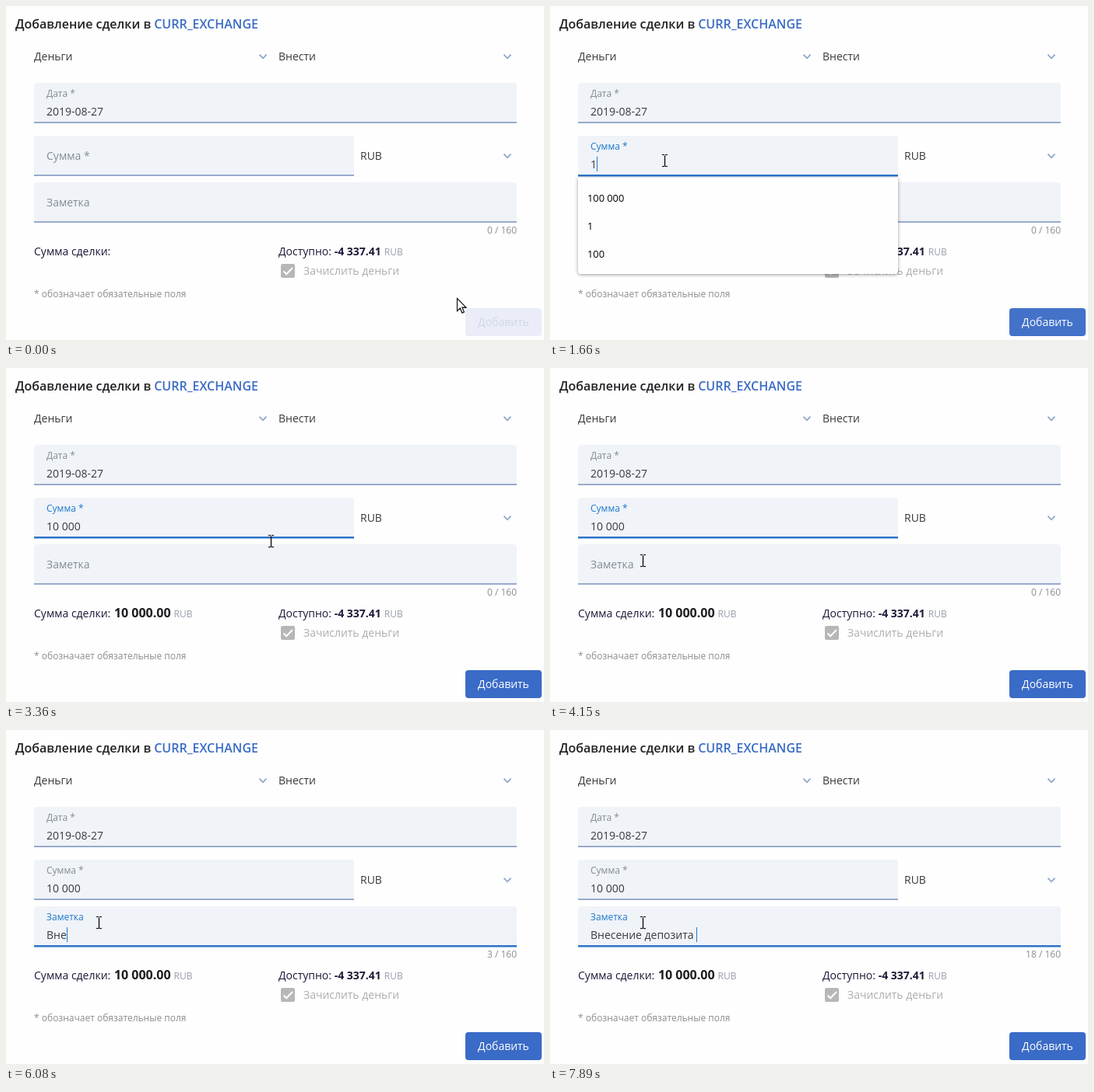
These frames come from a looping animation (691 px wide and 430 px high, 8 s). An HTML page with a canvas:

```html
<!DOCTYPE html>
<html lang="ru">
<head>
<meta charset="utf-8">
<title>Добавление сделки</title>
<style>
html, body { margin: 0; width: 100%; height: 100%; overflow: hidden; background: #fefefe; }
canvas { display: block; }
</style>
</head>
<body>
<canvas id="stage" width="691" height="430"></canvas>
<script>
const ctx = document.getElementById('stage').getContext('2d');
const LOOP = 8000, AMOUNT_FOCUS = 680, NOTE_FOCUS = 4155;

const GREY = [134, 139, 148], BLUE = [30, 120, 205];
const TEXT = '#3a3a3c', NAVY = '#1d1a38', PALE = '#9a9eae', HINT = '#8c8d92', LINK = '#3a6cc4';

const amountKeys = [[1510, '1'], [1740, '10'], [1920, '100'], [2200, '1 000'], [2440, '10 000']];
const noteText = 'Внесение депозита ';
const noteTimes = [5720, 5950, 6080, 6250, 6350, 6460, 6560, 6740, 6840,
  7020, 7100, 7250, 7360, 7460, 7570, 7680, 7780, 7890];
const noteKeys = noteTimes.map((time, i) => [time, noteText.slice(0, i + 1)]);
const amountHistory = ['100 000', '1', '100', '22', '7', '500 000'];
const noteHistory = ['ЗАметка'];

// time, x, y of the pointer
const pointerPath = [
  [40, 579, 376], [120, 470, 330], [240, 240, 226], [350, 150, 193], [630, 150, 193], [680, 147, 199],
  [3359, 147, 199], [3360, 341, 223], [3520, 190, 232], [3650, 60, 250], [3740, 11, 258],
  [3840, 11, 258], [4000, 105, 250], [4100, 119, 248]
];

const font = (size, weight = 400) => `${weight} ${size}px "Open Sans", "Noto Sans", sans-serif`;
const clamp = p => Math.min(1, Math.max(0, p));
const ease = p => 1 - (1 - clamp(p)) ** 3;
const lerp = (a, b, p) => a + (b - a) * p;
const mix = (a, b, p) => `rgb(${a.map((v, i) => Math.round(lerp(v, b[i], p)))})`;

function text(str, x, y, color = TEXT, size = 14, weight = 400, align = 'left') {
  ctx.font = font(size, weight);
  ctx.fillStyle = color;
  ctx.textAlign = align;
  ctx.fillText(str, x, y);
  return x + ctx.measureText(str).width;
}

function box(x, y, w, h, color, radii = 0) {
  ctx.fillStyle = color;
  ctx.beginPath();
  ctx.roundRect(x, y, w, h, radii);
  ctx.fill();
}

function line(points, color, width) {
  ctx.strokeStyle = color;
  ctx.lineWidth = width;
  ctx.beginPath();
  points.forEach(([x, y]) => ctx.lineTo(x, y));
  ctx.stroke();
}

const chevron = (x, y) => line([[x - 4.5, y - 2.3], [x, y + 2.3], [x + 4.5, y - 2.3]], '#8fa4c8', 1.8);

// floated: label raised 0..1, tint: label blue 0..1, focus: ms since focus or -1
function field(y, w, label, value, floated, tint, focus) {
  box(36, y, w, 52, '#f0f3f8', [4, 4, 0, 0]);
  box(36, y + 50, w, 2, '#97abcc');
  if (focus >= 0) {
    const width = w * lerp(0.5, 1, ease(focus / 300));
    ctx.globalAlpha = clamp(focus / 100);
    box(36 + (w - width) / 2, y + 50, width, 2.6, '#2d73c8');
    ctx.globalAlpha = 1;
  }
  text(label, 52, lerp(y + 31, y + 18, floated), mix(GREY, BLUE, tint), lerp(14, 12, floated));
  return text(value, 52, y + 42);
}

function caret(t, x, y, focusTime, keys) {
  const last = Math.max(focusTime, ...keys.map(k => k[0]).filter(time => time <= t));
  if ((t - last) % 1000 < 505) box(Math.round(x), y, 1, 19, '#2277cc');
}

function popup(y, w, history, typed) {
  const rows = history.filter(row => row.startsWith(typed));
  if (!rows.length) return;
  ctx.save();
  ctx.shadowColor = 'rgba(0,0,0,.4)';
  ctx.shadowBlur = 4;
  ctx.shadowOffsetY = 1;
  box(36, y, w, 16 + rows.length * 36, '#fefefe', [0, 0, 4, 4]);
  ctx.restore();
  rows.forEach((row, i) => text(row, 48, y + 31 + i * 36, '#000', 12.8, 500));
}

function typedAt(keys, t) {
  const done = keys.filter(k => k[0] <= t);
  return done.length ? done[done.length - 1][1] : '';
}

function pointerAt(t) {
  const next = pointerPath.findIndex(p => p[0] > t);
  if (next === 0) return pointerPath[0].slice(1);
  if (next < 0) return pointerPath[pointerPath.length - 1].slice(1);
  const a = pointerPath[next - 1], b = pointerPath[next];
  const p = (t - a[0]) / (b[0] - a[0]);
  return [lerp(a[1], b[1], p), lerp(a[2], b[2], p)];
}

function pointer(t) {
  const [x, y] = pointerAt(t).map(Math.round);
  const overField = x > 36 && y > 167 && y < 280 && x < (y < 227 ? 447 : 656);
  ctx.save();
  ctx.translate(x + 0.5, y + 0.5);
  if (overField) {
    line([[0, -7], [0, 7]], '#111', 1.4);
    for (const end of [-8, 7]) {
      line([[-3.5, end], [-0.5, end]], '#111', 1.2);
      line([[0.5, end], [3.5, end]], '#111', 1.2);
    }
  } else {
    ctx.fillStyle = '#fff';
    ctx.strokeStyle = '#111';
    ctx.lineWidth = 1.1;
    ctx.stroke(Object.assign(new Path2D('M0 0V16L3.8 12.5L6.4 18.5L8.8 17.4L6.3 11.6H11.4Z')));
    ctx.fill(new Path2D('M0 0V16L3.8 12.5L6.4 18.5L8.8 17.4L6.3 11.6H11.4Z'));
    ctx.stroke(new Path2D('M0 0V16L3.8 12.5L6.4 18.5L8.8 17.4L6.3 11.6H11.4Z'));
  }
  ctx.restore();
}

function draw(t) {
  const amount = typedAt(amountKeys, t), note = typedAt(noteKeys, t);
  const onAmount = t >= AMOUNT_FOCUS && t < NOTE_FOCUS, onNote = t >= NOTE_FOCUS;
  const amountUp = ease((t - AMOUNT_FOCUS) / 380), noteUp = ease((t - NOTE_FOCUS) / 380);
  const enabled = ease((t - 1500) / 260);

  box(0, 0, 691, 430, '#fefefe');
  const titleEnd = text('Добавление сделки в ', 12, 29, '#222226', 16, 600);
  text('CURR_EXCHANGE', titleEnd, 29, LINK, 16, 600);

  text('Деньги', 36, 70);
  text('Внести', 350, 70);
  text('RUB', 455, 198);
  chevron(330, 65);
  chevron(644, 65);
  chevron(644, 193);

  field(99, 620, 'Дата *', '2019-08-27', 1, 0, -1);
  const amountEnd = field(167, 411, 'Сумма *', amount, amountUp, amountUp - noteUp,
    onAmount ? t - AMOUNT_FOCUS : -1);
  const noteEnd = field(227, 620, 'Заметка', note, noteUp, noteUp, onNote ? t - NOTE_FOCUS : -1);
  if (onAmount) caret(t, amountEnd, 194, AMOUNT_FOCUS, amountKeys);
  if (onNote) caret(t, noteEnd, 254, NOTE_FOCUS, noteKeys);
  text(`${note.length} / 160`, 656, 293, HINT, 12, 400, 'right');

  const sumX = text('Сумма сделки: ', 36, 321, NAVY);
  if (amount) {
    const sumEnd = text(amount + '.00', sumX + 1, 321, '#1c1c20', 16, 700);
    text('RUB', sumEnd + 4, 321, PALE, 12);
  }
  const freeX = text('Доступно: ', 350, 321, NAVY);
  const freeEnd = text('-4 337.41', freeX, 321, NAVY, 14, 700);
  text('RUB', freeEnd + 4, 321, PALE, 12);

  box(353, 332, 18, 18, '#b7b7b7', 2);
  line([[356.5, 341.5], [360.2, 345.2], [368, 337]], '#fefefe', 2);
  text('Зачислить деньги', 382, 346, '#adadaf');
  text('* обозначает обязательные поля', 36, 375, HINT, 12);

  box(590, 389, 98, 36, mix([234, 237, 247], [58, 107, 198], enabled), 4);
  text('Добавить', 639, 412, mix([209, 214, 230], [255, 255, 255], enabled), 14, 400, 'center');

  if (onAmount) popup(221, 411, amountHistory, amount);
  if (onNote) popup(281, 192, noteHistory, note);
  pointer(t);
}

function tick() {
  draw(performance.now() % LOOP);
  requestAnimationFrame(tick);
}
tick();
</script>
</body>
</html>
```
